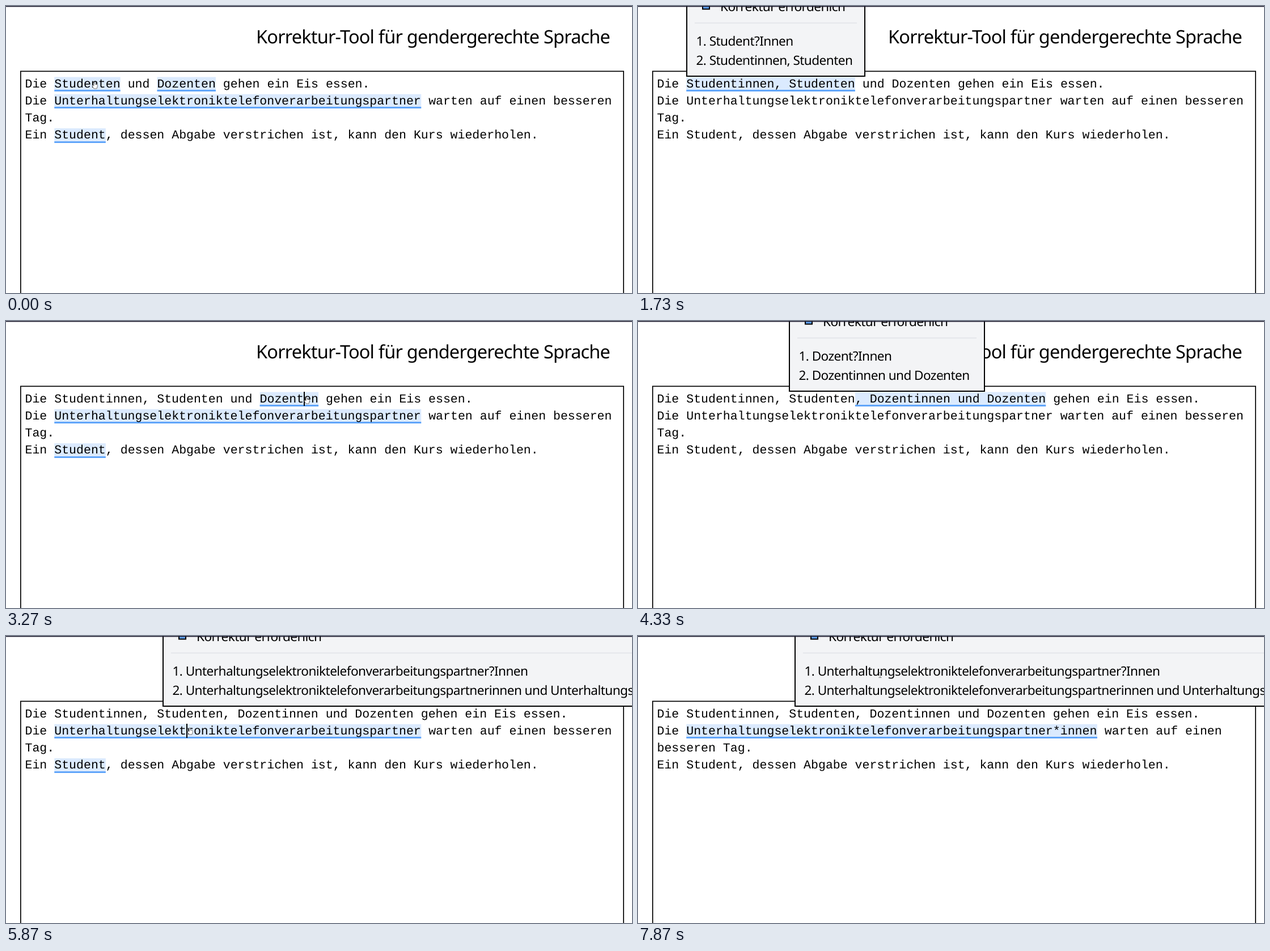
An HTML page with a canvas that plays this animation: 1104 px wide and 507 px high, repeating every 8 s.

```html
<!DOCTYPE html>
<html lang="de">
<head>
<meta charset="utf-8">
<title>Korrektur-Tool</title>
<style>
  html, body { margin: 0; width: 100%; height: 100%; overflow: hidden; background: #fff; }
  canvas { display: block; }
</style>
</head>
<body>
<canvas id="stage" width="1104" height="507"></canvas>
<script>
const ctx = document.getElementById('stage').getContext('2d');
const LOOP = 8000;
const COL = 12.94, ROW = 30.2, LEFT = 33.5, BASE = 143.5;
const MONO = '21.56px "Liberation Mono", "Courier New", monospace';
const SANS = '"Noto Sans", "Open Sans", sans-serif';
const LONG = 'Unterhaltungselektroniktelefonverarbeitungspartner';

// Square brackets mark highlighted passages.
const page = (people, partner, last) =>
  `Die ${people} gehen ein Eis essen.\nDie ${partner}\nEin ${last}, dessen Abgabe verstrichen ist, kann den Kurs wiederholen.`;
const wait = ' warten auf einen besseren\nTag.';
const plain = LONG + wait, marked = `[${LONG}]` + wait;
const bothPairs = 'Studentinnen, Studenten, Dozentinnen und Dozenten';

const popups = {
  students: { x: 85, w: 316, items: ['Student?Innen', 'Studentinnen, Studenten'] },
  teachers: { x: 266, w: 346, items: ['Dozent?Innen', 'Dozentinnen und Dozenten'] },
  partners: { x: 276, w: 1400, items: [LONG + '?Innen', `${LONG}innen und ${LONG}`] }
};

const start = page('[Studenten] und [Dozenten]', marked, '[Student]');
const second = page('Studentinnen, Studenten und [Dozenten]', marked, '[Student]');
const third = page(bothPairs, marked, '[Student]');

// start time, text, open popup
const scenes = [
  [0, start],
  [200, start, 'students'],
  [1200, page('[Studentinnen, Studenten] und Dozenten', plain, 'Student'), 'students'],
  [2540, second],
  [3400, second, 'teachers'],
  [3730, page('Studentinnen, Studenten[, Dozentinnen und Dozenten]', plain, 'Student'), 'teachers'],
  [5070, third],
  [5800, third, 'partners'],
  [6670, page(bothPairs, `[${LONG}innen und ]\n[${LONG}] warten auf einen besseren Tag.`, 'Student'), 'partners'],
  [7740, page(bothPairs, `[${LONG}*innen] warten auf einen\nbesseren Tag.`, 'Student'), 'partners']
];

// on, off, column, row
const carets = [
  [70, 600, 9, 0], [1200, 1730, 4, 0], [2270, 2800, 4, 0],
  [3200, 3730, 38, 0], [3730, 4330, 29, 0], [4870, 5400, 29, 0],
  [5470, 6000, 22, 1], [6530, 6670, 22, 1], [6670, 7330, 4, 1]
];

// time, x, y
const pointer = [
  [0, 157, 140], [600, 157, 140], [730, 160, 131], [1200, 160, 131], [1530, 186, 98],
  [2330, 186, 98], [3070, 531, 140], [3670, 531, 140], [4130, 537, 99],
  [5270, 537, 99], [5470, 325, 168], [6000, 325, 168], [6600, 379, 106],
  [6670, 379, 106], [7000, 395, 103], [7470, 395, 103], [7870, 427, 69], [LOOP, 427, 69]
];

function rect(x, y, w, h, color) {
  ctx.fillStyle = color;
  ctx.fillRect(x, y, w, h);
}

function text(str, x, y, font, spacing = 0) {
  ctx.font = font;
  ctx.letterSpacing = spacing + 'px';
  ctx.fillStyle = '#000';
  ctx.fillText(str, x, y);
}

function sans(str, x, y, size) {
  text(str, x, y, `${size}px ${SANS}`, -0.025 * size);
}

function drawText(doc) {
  doc.split('\n').forEach((line, row) => {
    const y = BASE + row * ROW;
    let x = LEFT;
    line.split(/[[\]]/).forEach((part, i) => {
      const w = part.length * COL;
      if (i % 2) {
        rect(x, y - 18, w, 22.5, '#dbeafe');
        rect(x, Math.round(y + 4.5), w, 3, '#60a5fa');
      }
      text(part, x, y, MONO);
      x += w;
    });
  });
}

function drawPopup({ x, w, items }) {
  rect(x, -10, w, 135, '#000');
  rect(x + 2, -10, w - 4, 133, '#f3f4f6');
  rect(x + 28, -8, 14, 14.5, '#000');
  rect(x + 30, -6, 10, 10.5, '#60a5fa');
  sans('Korrektur erforderlich', x + 60, 8.5, 22.6);
  rect(x + 15, 29, w - 30, 2, '#e5e7eb');
  items.forEach((item, i) => sans(`${i + 1}. ${item}`, x + 17.5, 70 + i * 33.5, 22.6));
}

function drawPointer(t) {
  const i = pointer.findIndex(p => p[0] > t);
  const [t0, x0, y0] = pointer[i - 1], [t1, x1, y1] = pointer[i];
  const k = (t - t0) / (t1 - t0), ease = k * k * (3 - 2 * k);
  const y = y0 + (y1 - y0) * ease;
  ctx.save();
  ctx.translate(x0 + (x1 - x0) * ease, y);
  ctx.lineWidth = 1;
  ctx.strokeStyle = '#777';
  ctx.fillStyle = '#fff';
  const hand = 'M-2 1V-5Q-1-7 0-5V-2L4-1Q5 0 4 3L3 6H-2L-5 1Q-4-1-2 1Z';
  const beam = 'M-2.5-4.5H2.5M0-4.5V4.5M-2.5 4.5H2.5';
  const shape = new Path2D(y > 125 ? hand : beam);
  if (y > 125) ctx.fill(shape);
  ctx.stroke(shape);
  ctx.restore();
}

function draw(t) {
  const [, doc, popup] = scenes.findLast(s => s[0] <= t);
  ctx.textRendering = 'geometricPrecision';
  rect(0, 0, 1104, 507, '#fff');
  sans('Korrektur-Tool für gendergerechte Sprache', 441, 66, 32.5);
  rect(25, 114.5, 1065, 400, '#000');
  rect(26.7, 116.2, 1061.6, 400, '#fff');
  drawText(doc);
  for (const [on, off, col, row] of carets)
    if (t >= on && t < off) rect(Math.round(LEFT + col * COL), 125 + Math.round(row * ROW), 2, 25, '#000');
  if (popup) drawPopup(popups[popup]);
  drawPointer(t);
  rect(0, 0, 1104, 1.5, '#1c1b2e');
}

function frame() {
  draw(performance.now() % LOOP);
  requestAnimationFrame(frame);
}
frame();
</script>
</body>
</html>
```
